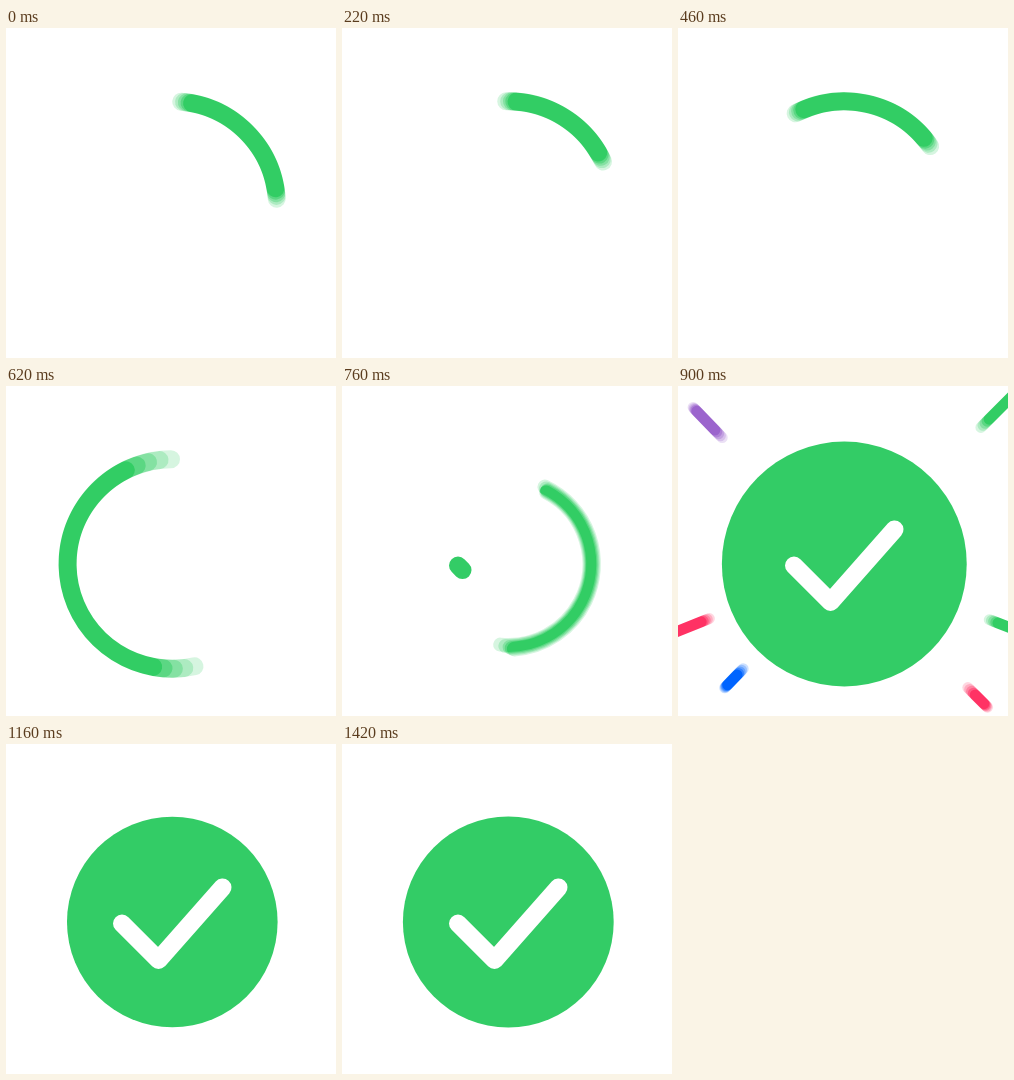
An HTML page with a canvas for the animation above (8 s loop, 330 px wide and 330 px high).

```html
<!DOCTYPE html>
<html lang="en">
<head>
<meta charset="utf-8">
<title>Loading to success</title>
<style>
html, body { margin: 0; height: 100%; overflow: hidden; background: #fff; }
canvas { display: block; width: 100vmin; height: 100vmin; }
</style>
</head>
<body>
<canvas id="stage" width="330" height="330"></canvas>
<script>
const ctx = document.getElementById('stage').getContext('2d');
const LOOP = 8000, STEP = 20, POP = 840;
const CX = 166.3, CY = 178, RADIUS = 104.7;
const SAMPLES = 5, SHUTTER = 10;
const GREEN = '#33cc66', RED = '#ff3366', PURPLE = '#9966cc', BLUE = '#0066ff';

// Spinner laps: time, then start and end of the arc in degrees
const laps = [[0, 8, 83], [220, 362, 422], [460, 695, 772], [760, 1108, 1259], [POP, 1140, 1500]];

// Angle in degrees, distance of the inner and outer end, colour
const rays = [
  [-134, 181, 215, PURPLE], [-45, 199, 240, GREEN], [21, 160, 192, GREEN],
  [45, 180, 200, RED], [134, 150, 170, BLUE], [158, 150, 188, RED]
];

const radians = degrees => degrees * Math.PI / 180;
const progress = (t, from, to) => Math.min(1, Math.max(0, (t - from) / (to - from)));
const mix = (a, b, u) => a + (b - a) * u;

function stroke(width, color) {
  ctx.lineWidth = width;
  ctx.strokeStyle = color;
  ctx.stroke();
}

// Averages several moments within the shutter time
function blurred(t, draw) {
  ctx.save();
  ctx.globalCompositeOperation = 'lighter';
  ctx.globalAlpha = 1 / SAMPLES;
  for (let i = 0; i < SAMPLES; i++) draw(t + (i / (SAMPLES - 1) - .5) * SHUTTER);
  ctx.restore();
}

// Each lap starts and ends slowly, and the arc stretches in the middle of it
function ring(t) {
  const i = Math.max(1, laps.findIndex(lap => lap[0] > t));
  const [t0, start0, end0] = laps[i - 1], [t1, start1, end1] = laps[i];
  const u = (t - t0) / (t1 - t0);
  const eased = u - .1 * Math.sin(2 * Math.PI * u);
  const stretch = 25 * Math.sin(Math.PI * u) ** 2;
  const start = mix(start0, start1, eased) - stretch;
  const end = mix(end0, end1, eased) + stretch;
  const r = RADIUS - 21.5 * (Math.max(0, t - 660) / 100) ** 2;
  ctx.beginPath();
  ctx.arc(CX, CY, r, radians(start - 90), radians(end - 90));
  stroke(18 * r / RADIUS, GREEN);
}

function burst(t) {
  const p = (t - POP) / 60;
  for (const [angle, inner, outer, color] of rays) {
    const tail = inner * mix(.65, 1, p), tip = outer * mix(.85, 1, p);
    if (tail > tip) continue;
    const x = Math.cos(radians(angle)), y = Math.sin(radians(angle));
    ctx.beginPath();
    ctx.moveTo(CX + x * tail, CY + y * tail);
    ctx.lineTo(CX + x * tip, CY + y * tip);
    stroke(11, color);
  }
}

// Damped spring around the final radius
function disc(t) {
  const s = t - POP - 25;
  const r = 105.4 + 35.6 * Math.exp(-.0193 * s) * Math.sin(Math.PI * s / 90);
  ctx.fillStyle = GREEN;
  ctx.beginPath();
  ctx.arc(CX, CY, r, 0, 2 * Math.PI);
  ctx.fill();
}

function check(t, color) {
  ctx.setLineDash([160 * progress(t, 740, POP) ** 2, 999]);
  ctx.beginPath();
  ctx.moveTo(116, 179.5);
  ctx.lineTo(152.5, 216);
  ctx.lineTo(216.5, 143.5);
  stroke(18, color);
  ctx.setLineDash([]);
}

function render(t) {
  ctx.clearRect(0, 0, 330, 330);
  ctx.lineCap = ctx.lineJoin = 'round';
  if (t < POP) {
    blurred(t, ring);
    if (t > 740) check(t, GREEN);
  } else {
    if (t < 980) blurred(t, burst);
    disc(t);
    check(t, '#fff');
  }
}

const begin = performance.now();
function tick() {
  const t = (performance.now() - begin) % LOOP;
  render(Math.floor(t / STEP) * STEP);
  requestAnimationFrame(tick);
}
tick();
</script>
</body>
</html>
```
